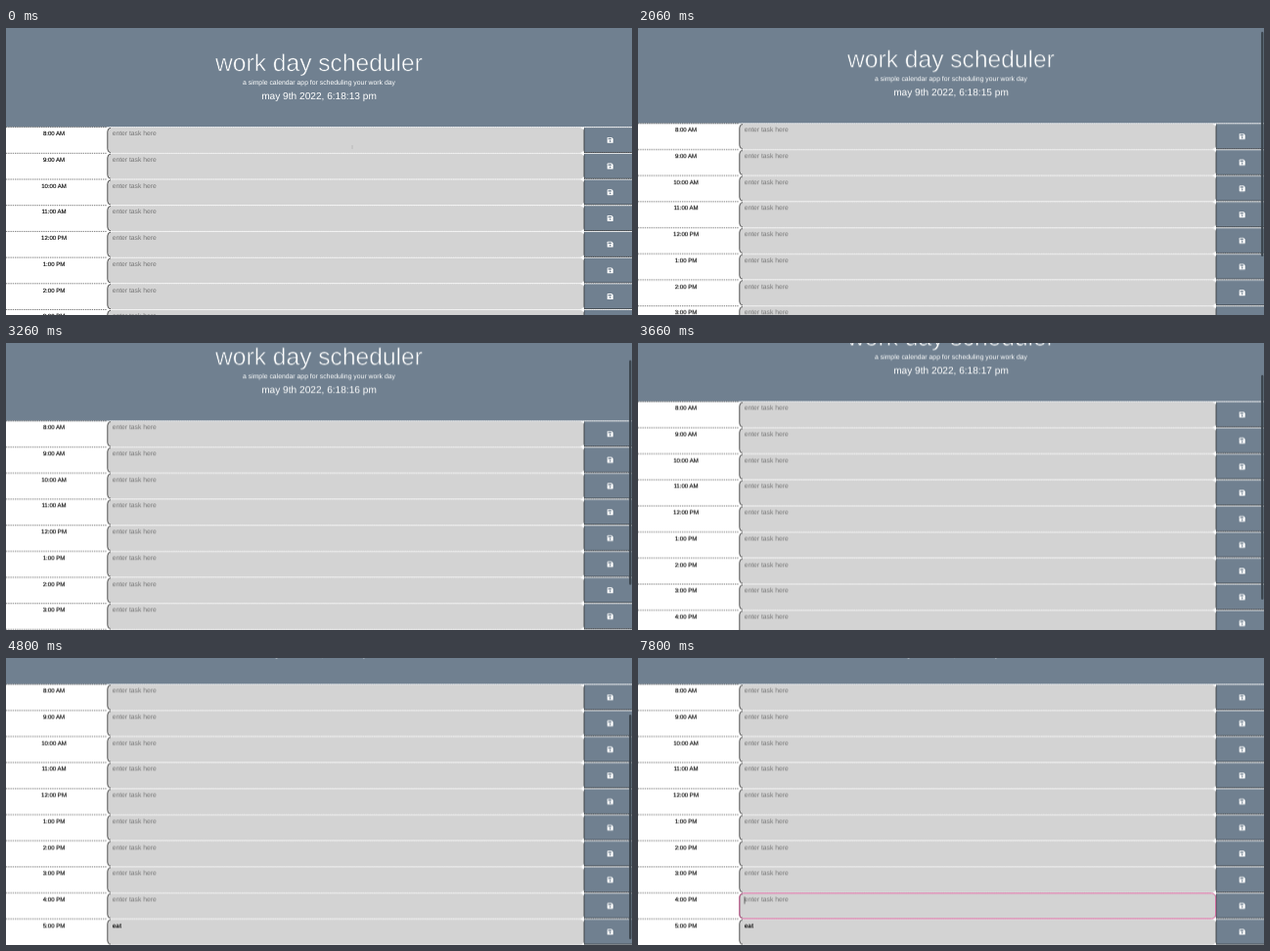
These frames come from a looping animation (640 px wide and 294 px high, 8000 ms). An HTML page:

```html
<!DOCTYPE html>
<html lang="en">
<head>
<meta charset="utf-8">
<title>Work day scheduler</title>
<style>
  html, body { margin: 0; height: 100%; overflow: hidden; background: #fff; }
  svg { display: block; width: 100vw; height: 100vh; }
  text { font-family: "Liberation Sans", Arial, sans-serif; text-rendering: geometricPrecision; }

  .head { fill: #fff; text-anchor: middle; }
  .title { font-size: 24.6px; stroke: #708090; stroke-width: .55px; }
  .lead { font-size: 6.85px; }
  .clock { font-size: 10.15px; }

  .hour { font-size: 6.05px; text-anchor: middle; fill: #000; stroke: #000; stroke-width: .12px; }
  .hint { font-size: 6.75px; fill: #757575; }
  .task { font-size: 6.5px; font-weight: bold; fill: #111; }
  .dash { stroke: #444; stroke-width: .7px; stroke-dasharray: 1.35 .9; }
  .gap { stroke: #f4f4f4; stroke-width: .8px; stroke-dasharray: 1.35 .9; }
  .edge { fill: none; stroke: #333; stroke-width: .8px; }

  .page, .thumb, .focus, .caret, .pointer { animation: 8s linear infinite; }
  .page { animation-name: scroll; }
  .thumb { animation-name: thumb-move, thumb-show; }
  .focus { animation-name: focus; animation-timing-function: step-end; }
  .caret { animation-name: caret; animation-timing-function: step-end; }
  .pointer { animation-name: pointer; animation-timing-function: step-end; }

  @keyframes scroll {
    0%, 21.66% { transform: translateY(0); }
    22.5% { transform: translateY(-.4px); animation-timing-function: ease-out; }
    27.5%, 31.2% { transform: translateY(-4.5px); }
    35% { transform: translateY(-10.7px); animation-timing-function: ease-out; }
    41.6%, 43.4% { transform: translateY(-22px); }
    45.75% { transform: translateY(-41.5px); animation-timing-function: ease-out; }
    49.12% { transform: translateY(-49.3px); }
    50.75%, 55% { transform: translateY(-50px); animation-timing-function: ease-out; }
    60%, 100% { transform: translateY(-74.6px); }
  }
  @keyframes thumb-move {
    0%, 22.5% { transform: translateY(1px); animation-timing-function: ease-out; }
    27.5%, 31.2% { transform: translateY(4.5px); }
    35% { transform: translateY(9.2px); animation-timing-function: ease-out; }
    41.6%, 43.4% { transform: translateY(17.9px); }
    45.75% { transform: translateY(32.8px); animation-timing-function: ease-out; }
    49.12% { transform: translateY(38.8px); }
    50.75%, 55% { transform: translateY(39.3px); animation-timing-function: ease-out; }
    60%, 100% { transform: translateY(58.1px); }
  }
  @keyframes thumb-show {
    0%, 22.6% { opacity: 0; }
    23.4%, 65.7% { opacity: 1; }
    71.6%, 100% { opacity: 0; }
  }
  @keyframes focus {
    0% { opacity: 0; }
    82.5%, 100% { opacity: 1; }
  }
  @keyframes caret {
    0% { opacity: 0; }
    82.5% { opacity: 1; }
    88.25% { opacity: 0; }
    94.12%, 100% { opacity: 1; }
  }
  @keyframes pointer {
    0% { transform: translate(354px, 122px); opacity: 1; }
    4.12% { transform: translate(309.5px, 146px); }
    10.75% { transform: translate(299px, 106.5px); opacity: 1; }
    22.6%, 100% { transform: translate(299px, 106.5px); opacity: 0; }
  }
</style>
</head>
<body>
<svg viewBox="0 0 640 294" preserveAspectRatio="none">
  <defs>
    <g id="row">
      <rect width="640" height="26.9" fill="#fff"/>
      <rect x="103.6" y=".3" width="487" height="26.2" rx="4.2" fill="#d3d3d3"/>
      <path class="dash" d="M0 0H103.5"/>
      <path class="gap" d="M106 0H640"/>
      <path class="edge" d="M107 .7Q103.8 1.2 103.8 4.6V22.2Q103.8 25.6 107 26.1"/>
      <rect x="590.8" y=".5" width="49.2" height="25.9" fill="#708090"/>
      <path class="edge" d="M591 1V26H640"/>
      <path d="M588.2 .3H591V3Q590.4 .9 588.2 .3ZM588.2 26.5H591V23.8Q590.4 25.9 588.2 26.5Z" fill="#fff"/>
      <path d="M615.3 10.3H619.2L620.7 11.8V15.6Q620.7 16.2 620.1 16.2H615.3Q614.7 16.2 614.7 15.6V10.9Q614.7 10.3 615.3 10.3Z" fill="#fff"/>
      <path d="M615.6 11.2H618.9V12.6H615.6Z" fill="#708090"/>
      <circle cx="617.7" cy="14.3" r=".85" fill="#708090"/>
    </g>
  </defs>

  <g class="page">
    <rect y="-1" width="640" height="102.6" fill="#708090"/>
    <g class="head">
      <text class="title" x="320" y="44">work day scheduler</text>
      <text class="lead" x="320" y="58.2">a simple calendar app for scheduling your work day</text>
      <text class="clock" x="320" y="73.4">may 9th 2022, 6:18:13 pm</text>
    </g>
    <g id="rows"></g>
    <rect class="focus" x="103.8" y="315.6" width="486.8" height="26" rx="4.2" fill="none" stroke="#dc64a0" stroke-width=".95"/>
    <path class="caret" d="M109 319.1V326.5" stroke="#222" stroke-width=".6"/>
  </g>
  <rect class="thumb" x="637.1" width="2.3" height="230" rx="1.1" fill="#3b444d"/>
  <path class="pointer" d="M0 -2V2" stroke="#aaa" stroke-width=".6"/>
</svg>
<script>
  const TOP = 101.6, PITCH = 26.7, FIRST_HOUR = 8;
  const clock = document.querySelector('.clock');
  const page = document.querySelector('.page');

  const hourLabel = h => `${(h + 11) % 12 + 1}:00 ${h < 12 ? 'AM' : 'PM'}`;

  function rowMarkup(_, i) {
    const hour = FIRST_HOUR + i;
    const [kind, text] = hour === 17 ? ['task', 'eat'] : ['hint', 'enter task here'];
    return `<g transform="translate(0 ${TOP + i * PITCH})">
      <use href="#row"/>
      <text class="hour" x="49" y="8.8">${hourLabel(hour)}</text>
      <text class="${kind}" x="108.7" y="8.8">${text}</text>
    </g>`;
  }
  document.getElementById('rows').innerHTML = Array.from({ length: 10 }, rowMarkup).join('');

  const scroll = page.getAnimations()[0];
  function tick() {
    const ms = (scroll.currentTime || 0) % 8000;
    const text = `may 9th 2022, 6:18:${13 + Math.floor((ms + 470) / 1000)} pm`;
    if (clock.textContent !== text) clock.textContent = text;
    requestAnimationFrame(tick);
  }
  tick();
</script>
</body>
</html>
```
